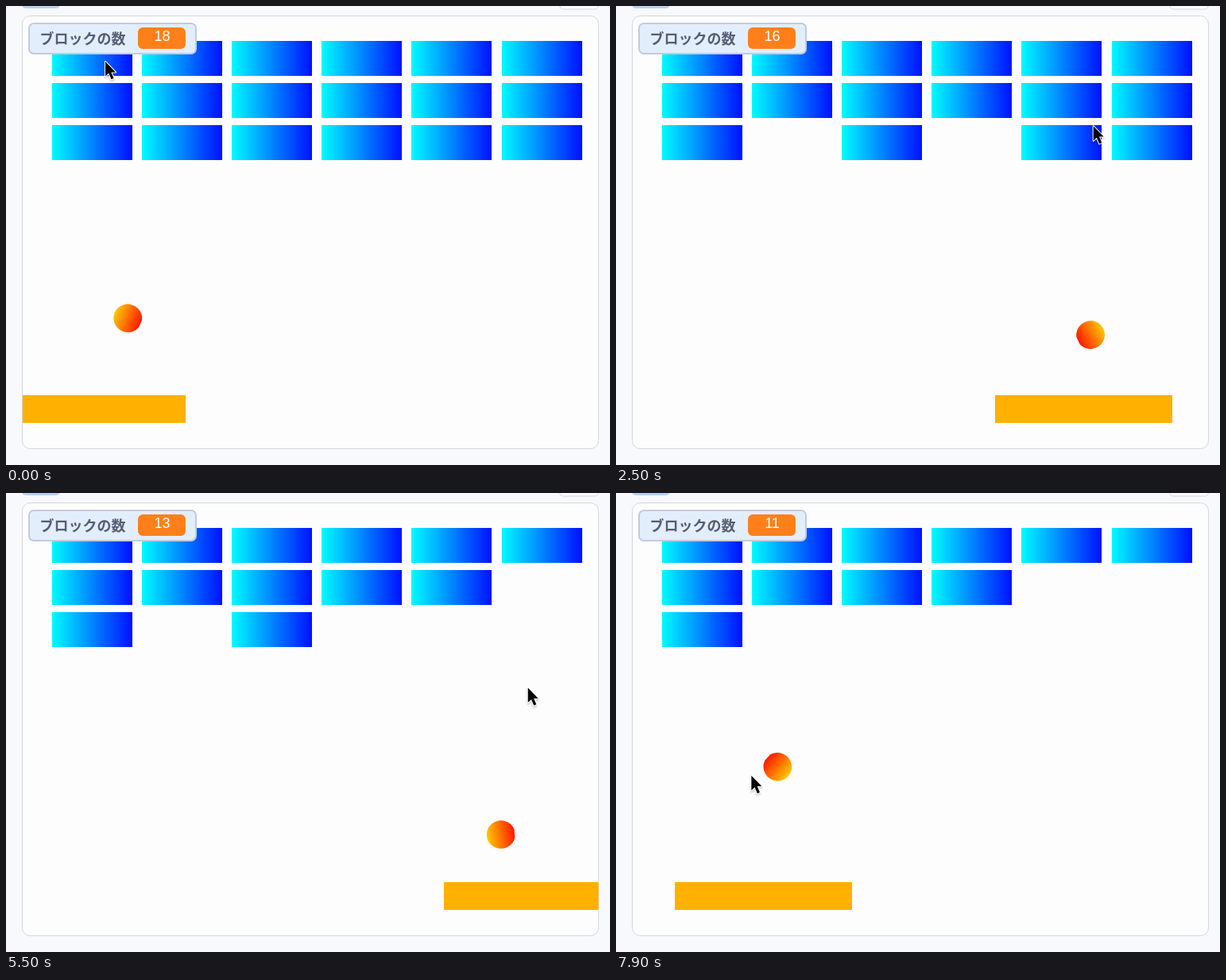
An HTML page for the animation above (8 s loop, 760 px wide and 578 px high).

```html
<!DOCTYPE html>
<html lang="ja">
<head>
<meta charset="utf-8">
<style>
  html, body { margin: 0; width: 100%; height: 100%; overflow: hidden; background: #f8f9fc; }
  svg { display: block; }
  .crisp { shape-rendering: crispEdges; }
  .label { font: bold 18px "Noto Sans CJK JP", "Noto Sans CJK", sans-serif; fill: #575e75; }
  .count { font: 18px "Liberation Sans", sans-serif; fill: #fff; text-anchor: middle; }
</style>
</head>
<body>
<svg width="760" height="578" viewBox="0 0 760 578">
  <defs>
    <linearGradient id="blue">
      <stop offset="0" stop-color="#00fbff"/>
      <stop offset="1" stop-color="#0010ff"/>
    </linearGradient>
    <linearGradient id="fire">
      <stop offset="0" stop-color="#ffc800"/>
      <stop offset="1" stop-color="#ff1800"/>
    </linearGradient>
    <clipPath id="stage"><rect x="21" y="13" width="724.5" height="544" rx="10"/></clipPath>
  </defs>
  <rect x="20" y="-12" width="48" height="15" rx="5" fill="#b8d0f2"/>
  <rect x="696.5" y="-20" width="49" height="24" rx="5" fill="#fdfdfe" stroke="#d4d6e0"/>
  <rect x="20.5" y="12.5" width="725" height="545" rx="10" fill="#fdfdfe" stroke="#d4d6e0"/>
  <g clip-path="url(#stage)">
    <g id="blocks" class="crisp" fill="url(#blue)"></g>
    <rect id="paddle" class="crisp" y="490" width="223" height="34.5" fill="#ffb000"/>
    <path id="ball" fill="url(#fire)" d="M17 6A18 17.7 0 1 1 17.5 -4Z"/>
  </g>
  <rect x="29" y="22" width="210" height="38" rx="6" fill="#e3eefc" stroke="#c2cbdc" stroke-width="2"/>
  <text class="label" x="42.500" y="47.500">ブロックの数</text>
  <rect x="166" y="27" width="60" height="27" rx="6" fill="#ff801a"/>
  <text class="count" id="count" x="196.500" y="44"></text>
  <path id="cursor" d="M0 0V18.500L4.200 14.600L7.500 22.300L10.600 21L7.300 13.400H13Z"
    stroke="#fff" stroke-width="2" paint-order="stroke" stroke-linejoin="round"
    style="filter:drop-shadow(0 2px 1px #0003)"/>
</svg>
<script>
const LOOP = 8000, STEP = 100, HAND_LEAD = 60;
const PADDLE_Y = 477, REACH = 20, GAP = 13;
const BLOCK = { width: 101, height: 44 };
const el = id => document.getElementById(id);

// time and x of each bounce: paddle, blocks, paddle, ...
const bounces = [
  [-215, 129], [475, 207], [1168, 286], [1840, 456], [2700, 640], [3270, 727],
  [3890, 634], [4630, 631], [5400, 634], [6085, 557], [6830, 444], [7546, 293],
  [8240, 117]
];
// time, x and y of the hand; the paddle trails its x
const hand = [
  [0, 114.5, 67], [1100, 307.5, 122], [1800, 449.5, 136], [2700, 628.5, 154],
  [4000, 628.5, 154], [4600, 678.5, 173], [5200, 692, 200], [6400, 574.5, 351],
  [8000, 160, 356]
];

const blocks = [];
for (let row = 0; row < 3; row++) {
  for (let col = 0; col < 6; col++) {
    const rect = document.createElementNS("http://www.w3.org/2000/svg", "rect");
    const block = { rect, col, x: 58 + 113.1 * col, y: 44.3 + 53 * row, end: Infinity };
    for (const [key, value] of Object.entries({ x: block.x, y: block.y, ...BLOCK })) {
      rect.setAttribute(key, value);
    }
    el("blocks").append(rect);
    blocks.push(block);
  }
}

// Breaks the lowest block of every column in reach, returns the height of the bounce.
function strike(t, x) {
  const lowest = {};
  for (const block of blocks) {
    const inReach = x + REACH > block.x && x - REACH < block.x + BLOCK.width;
    if (inReach && block.end > t) lowest[block.col] = block;
  }
  const struck = Object.values(lowest);
  for (const block of struck) block.end = t;
  return Math.min(...struck.map(block => block.y)) + BLOCK.height + GAP;
}

const ballPath = bounces.map(([t, x], i) => [t, x, i % 2 ? strike(t, x) : PADDLE_Y]);

function sample(path, t) {
  const i = path.findIndex(p => p[0] > t);
  const a = path[i - 1], b = path[i];
  const k = (t - a[0]) / (b[0] - a[0]);
  const [, x, y] = a.map((v, n) => v + (b[n] - v) * k);
  return { x, y, heading: Math.atan2(b[1] - a[1], a[2] - b[2]) * 180 / Math.PI };
}

function draw(t) {
  const ball = sample(ballPath, t);
  el("ball").setAttribute("transform", `translate(${ball.x} ${ball.y}) rotate(${ball.heading + 6})`);

  const tip = sample(hand, t + HAND_LEAD);
  el("cursor").setAttribute("transform", `translate(${tip.x} ${tip.y})`);
  el("paddle").setAttribute("x", sample(hand, t).x - 111.5);

  for (const { rect, end } of blocks) rect.style.display = t < end ? "" : "none";
  el("count").textContent = blocks.filter(block => t < block.end).length;
}

const start = performance.now();
function tick() {
  const t = (performance.now() - start) % LOOP;
  draw(Math.floor(t / STEP) * STEP);
  requestAnimationFrame(tick);
}
tick();
</script>
</body>
</html>
```
